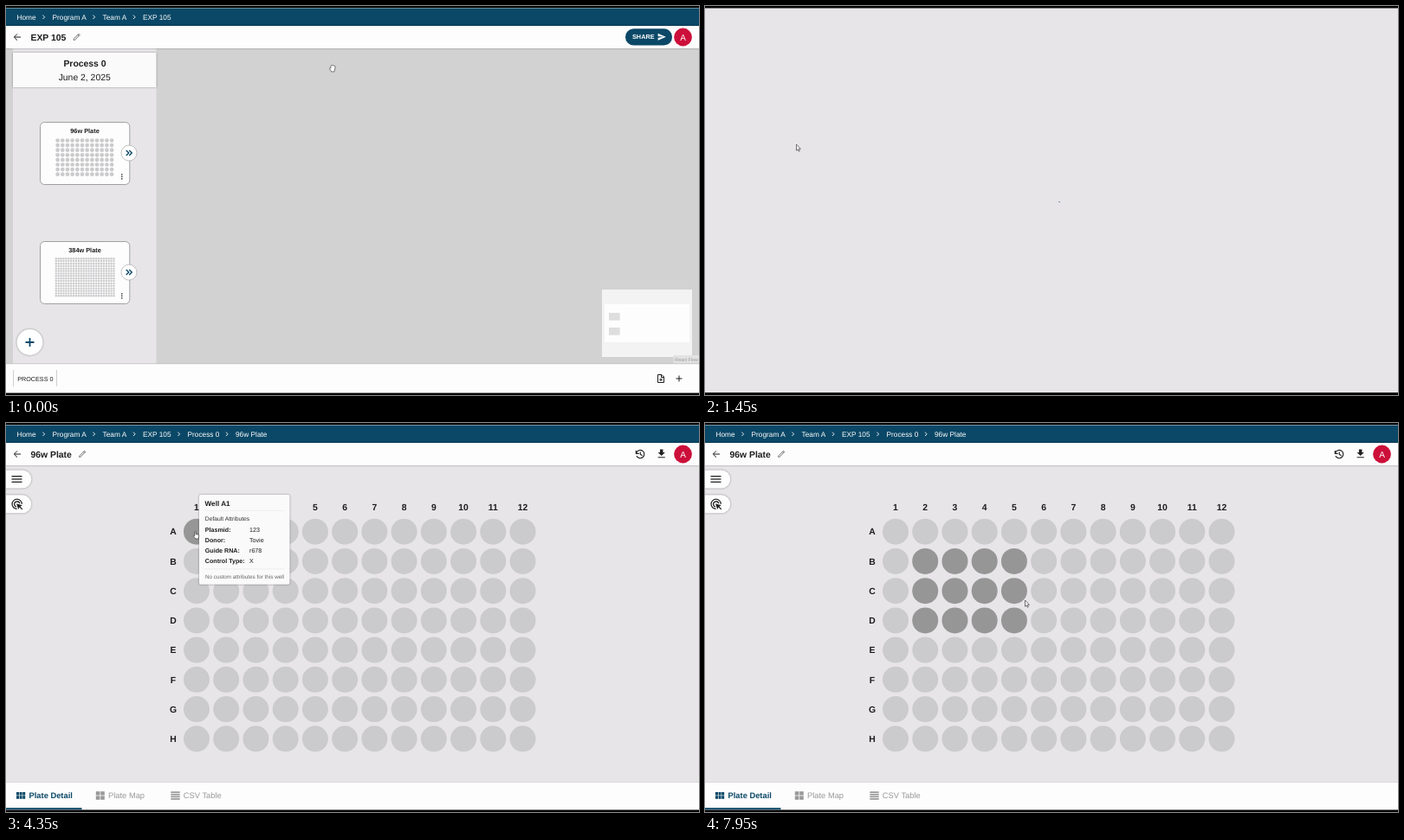
An HTML page that plays this animation: 800x450 px, repeating every 8000 ms.

```html
<!DOCTYPE html>
<html lang="en">
<head>
<meta charset="utf-8">
<title>Plate viewer</title>
<style>
  html, body { margin: 0; width: 100%; height: 100%; overflow: hidden; background: #000; }
  svg { display: block; width: 100vw; height: 100vh; }
  text { font-family: "Liberation Sans", Arial, sans-serif; text-rendering: geometricPrecision; white-space: pre; }
  .shadow { filter: drop-shadow(0 .7px 1.2px rgba(0, 0, 0, .4)); }
</style>
</head>
<body>
<svg id="stage" viewBox="0 0 800 450"></svg>
<script>
const LOOP = 8000, LOAD_AT = 1425, PLATE_AT = 2050;
const BLUE = '#0b4867', INK = '#1d1d1f', GREY = '#999', PALE = '#e7e5e8', WELL = '#cbcacc', DARK = '#969696';
const PITCH = 34.23, X0 = 220, Y0 = 125.7, R = 15;

const rect = (x, y, w, h, fill, extra = '') =>
  `<rect x="${x}" y="${y}" width="${w}" height="${h}" fill="${fill}" ${extra}/>`;
const circle = (x, y, r, fill, extra = '') =>
  `<circle cx="${x}" cy="${y}" r="${r}" fill="${fill}" ${extra}/>`;
const text = (x, y, size, str, { fill = INK, bold = false, mid = false } = {}) =>
  `<text x="${x}" y="${y}" font-size="${size}" fill="${fill}"${bold ? ' font-weight="700"' : ''}${mid ? ' text-anchor="middle"' : ''}>${str}</text>`;
// Icons live in a 24-unit box centred on x, y.
const icon = (x, y, size, d, fill = INK) =>
  `<path transform="translate(${x - size / 2} ${y - size / 2}) scale(${size / 24})" d="${d}" fill="${fill}"/>`;
const lineIcon = (x, y, size, d, color = INK, width = 2) =>
  `<path transform="translate(${x - size / 2} ${y - size / 2}) scale(${size / 24})" d="${d}" fill="none" stroke="${color}" stroke-width="${width}"/>`;
const grid = (cols, rows, draw) =>
  Array.from({ length: cols * rows }, (_, i) => draw(i % cols, Math.floor(i / cols))).join('');

const PLUS = 'M12 5V19M5 12H19';
const PENCIL = 'M4 17L15 6l3 3L7 20H4zM16 5l2-2 3 3-2 2z';
const bars = (x, y, w, n, step, h, fill) => grid(1, n, (_, j) => rect(x, y + j * step, w, h, fill));

function header(crumbs, title, pencilX) {
  const xs = [12.5, 53.5, 111.5, 158, 209.5, 265];
  return rect(0, 2.5, 800, 20.5, BLUE) + rect(0, 23, 800, 26, '#fdfdfd', 'class="shadow"') +
    crumbs.map((c, i) => text(xs[i], 15.6, 8.3, c, { fill: '#fff' }) +
      (i ? lineIcon(xs[i] - 10, 12.8, 9, 'M9 6l6 6-6 6', '#fff', 2.4) : '')).join('') +
    lineIcon(13, 36, 12, 'M20 12H5M12 4.7L4.7 12l7.3 7.3') +
    text(28.5, 39.6, 10.4, title, { bold: true }) +
    lineIcon(pencilX, 36, 10, PENCIL, '#555', 2) +
    circle(781.5, 36, 10.4, '#cc0f3a') + text(781.5, 39.6, 10, 'A', { fill: '#fff', mid: true });
}

function plateNode(y, title, cols, rows, x0, y0, dx, dy, r) {
  return rect(39.5, y, 103.3, 72, '#fdfdfd', 'rx="5" stroke="#8c8c8c" stroke-width=".8"') +
    text(91, y + 12.3, 7.35, title, { bold: true, mid: true }) +
    grid(cols, rows, (i, j) => circle(x0 + i * dx, y0 + j * dy, r, WELL)) +
    grid(1, 3, (_, j) => circle(133.8, y + 60.4 + j * 2.5, .8, '#333')) +
    circle(142, y + 35.6, 9, '#fff', 'stroke="#aaa" stroke-width=".7"') +
    lineIcon(142, y + 35.6, 12, 'M5.5 6l6 6-6 6M12.5 6l6 6-6 6', BLUE, 2.8);
}

const processPage = rect(0, 2, 800, 445.5, '#d2d2d3') +
  rect(8, 49, 165.5, 365, PALE) +
  rect(8, 54, 165.5, 40, '#fafafa', 'class="shadow"') +
  text(91, 69.7, 10.4, 'Process 0', { bold: true, mid: true }) +
  text(90.7, 85.6, 10.4, 'June 2, 2025', { mid: true }) +
  plateNode(134.5, '96w Plate', 12, 8, 59.6, 155.5, 5.68, 5.6, 2.35) +
  plateNode(272.5, '384w Plate', 24, 16, 57.8, 292.2, 2.9, 2.87, 1.2) +
  circle(27.5, 389, 15, '#fff', 'class="shadow"') +
  lineIcon(27.5, 389, 17, PLUS, BLUE, 2.5) +
  rect(688, 328, 104, 78, '#f3f3f3') + rect(691, 345, 98, 44, '#fdfdfd') +
  rect(696, 355, 12.7, 8.7, '#dedede') + rect(696, 372, 12.7, 8.7, '#dedede') +
  rect(770.5, 404, 29.5, 9.5, '#e2e2e2') + text(772, 410.6, 5.4, 'React Flow', { fill: GREY }) +
  rect(0, 414, 800, 33.3, '#fdfdfd') + rect(0, 413.5, 800, .7, '#bbb') +
  rect(8.2, 421, .7, 19, '#bbb') + rect(58.2, 421, .7, 19, '#bbb') +
  text(13.3, 433.5, 7.2, 'PROCESS 0') +
  lineIcon(756, 431, 12, 'M5 3H14l5 5V21H5zM13 3V9H19M12 11V18M8.5 14.5H15.5') +
  lineIcon(777, 431, 12, PLUS) +
  header(['Home', 'Program A', 'Team A', 'EXP 105'], 'EXP 105', 81.5) +
  rect(715, 26.2, 54, 19.3, BLUE, 'rx="9.6"') +
  text(723, 38.4, 7.3, 'SHARE', { fill: '#fff', bold: true }) +
  icon(757, 35.8, 10.5, 'M2 21L23 12 2 3V10l15 2-15 2z', '#fff');

const loadingPage = rect(0, 2.5, 800, 444.7, PALE) +
  `<circle id="spinner" r="20.2" fill="none" stroke="${BLUE}" stroke-width="3.6"/>`;

const sidePill = y => rect(-12, y, 41.3, 21, '#fdfdfd', 'rx="10.5" class="shadow"');
const platePage = rect(0, 2, 800, 445.3, PALE) +
  header(['Home', 'Program A', 'Team A', 'EXP 105', 'Process 0', '96w Plate'], '96w Plate', 88) +
  lineIcon(732, 36, 14, 'M5 15.5A8 8 0 1 0 4.5 10M4 5V11H10M12.5 7.5V12.5l4 2.5', '#222', 2) +
  icon(756.7, 35.7, 14, 'M5 20H19V18H5zM19 9H15V3H9V9H5l7 7z', '#222') +
  sidePill(54.5) + bars(6.5, 61, 12, 3, 3.3, 1.3, '#222') +
  sidePill(83.3) +
  lineIcon(12.7, 93.8, 15, 'M12 21A9 9 0 1 1 21 12M11 17A5 5 0 1 1 17 11', '#222', 2) +
  icon(12.7, 93.8, 15, 'M11 11L22 14.5 18 16.5 22.5 21 21 22.5 16.5 18 14.5 22z', '#222') +
  grid(12, 1, i => text(X0 + i * PITCH, 101, 10.4, i + 1, { bold: true, mid: true })) +
  grid(1, 8, (_, j) => text(193, Y0 + j * PITCH + 3.7, 10.4, 'ABCDEFGH'[j], { bold: true, mid: true })) +
  grid(12, 8, (i, j) => circle(X0 + i * PITCH, Y0 + j * PITCH, R, WELL, 'class="well"')) +
  rect(0, 415.5, 800, 31.8, '#fdfdfd') + rect(0, 415.2, 800, .6, '#ccc') +
  rect(0, 445.2, 87.5, 2, BLUE) +
  grid(3, 2, (i, j) => rect(12 + i * 3.6, 427 + j * 4.2, 3, 3.6, BLUE)) +
  text(26.5, 433.9, 9.35, 'Plate Detail', { fill: BLUE, bold: true }) +
  grid(2, 2, (i, j) => rect(103.8 + i * 5.4, 426.2 + j * 5.2, 4.6, 4.4, GREY)) +
  text(118, 433.9, 9.35, 'Plate Map', { fill: GREY }) +
  bars(190.3, 426.3, 10.4, 4, 2.6, 1.7, GREY) +
  text(204.8, 433.9, 9.35, 'CSV Table', { fill: GREY });

const attributes = [['Plasmid:', '123'], ['Donor:', 'Tovie'], ['Guide RNA:', 'r678'], ['Control Type:', 'X']];
const tooltip = rect(223, 83, 104.5, 103.7, '#fafafa', 'rx="2" class="shadow"') +
  text(229.5, 96.2, 8.2, 'Well A1', { bold: true }) + rect(229.5, 101.5, 92, .5, '#e6e6e6') +
  text(229.8, 113, 6.75, 'Default Attributes', { fill: '#333' }) +
  attributes.map(([key, value], i) => text(229.8, 125.6 + i * 12.1, 7.15, key, { bold: true }) +
    text(281, 125.6 + i * 12.1, 7.15, value)).join('') +
  rect(229.5, 168.7, 92, .5, '#e0e0e0') +
  text(230, 180, 6.3, 'No custom attributes for this well', { fill: '#666' });

const outline = 'fill="#fff" stroke="#222" stroke-width=".6" stroke-linejoin="round"';
const cursors = {
  arrow: `<path d="M0 0V7.2L1.6 5.8 2.7 8.2 3.8 7.7 2.8 5.3H4.9Z" ${outline}/>`,
  hand: `<path d="M-.6 .4Q0-.5.6.4V3.2L3.6 3.9Q4.4 4.2 4.3 5L3.7 8.6H.3L-2.3 5.4Q-2.2 4.3-.6 5.3Z" ${outline}/>`,
  grab: `<path d="M-2.1-2.6Q-1.5-3.6-.9-3 -.1-4.2.6-3.1 1.5-3.6 1.9-2.5 3-2.7 3.1-1.5L2.5 2.2 1.7 4H-1.3L-3.5.7Q-3.5-.5-2-.2Z" ${outline}/>`
};

const group = (id, body) => `<g id="${id}">${body}</g>`;
const stage = document.getElementById('stage');
stage.innerHTML = rect(0, 0, 800, 450, '#000') +
  group('process', processPage) + group('loading', loadingPage) + group('plate', platePage) +
  group('tooltip', tooltip) +
  group('cursor', Object.entries(cursors).map(([id, body]) => group(id, body)).join(''));

const $ = id => document.getElementById(id);
const show = (id, on) => $(id).setAttribute('display', on ? 'inline' : 'none');
const wells = [...document.querySelectorAll('.well')].map((node, i) =>
  ({ node, x: X0 + i % 12 * PITCH, y: Y0 + Math.floor(i / 12) * PITCH }));

const clamp = v => Math.min(1, Math.max(0, v));
const ease = v => v * v * (3 - 2 * v);
const mix = (a, b, k) => a + (b - a) * k;

// Pointer path: time, x, y
const path = [
  [0, 377, 72], [150, 377, 72], [1200, 105.5, 160], [2150, 105.5, 160], [2750, 155.5, 116.5],
  [3250, 218.5, 125.3], [5250, 218.5, 125.3], [5700, 200.5, 110.5], [5850, 200.5, 110.5],
  [6050, 203, 141], [6250, 237, 143], [6400, 237, 143], [7250, 373, 240], [7450, 373, 240],
  [7850, 369.5, 205], [LOOP, 369.5, 205]
];
const DRAG = { start: 6400, end: 7250, x: 237, y: 143 };

function pointerAt(t) {
  const i = Math.max(1, path.findIndex(p => p[0] > t));
  const [a, b] = [path[i - 1], path[i]];
  const k = ease(clamp((t - a[0]) / (b[0] - a[0])));
  return { x: mix(a[1], b[1], k), y: mix(a[2], b[2], k) };
}

function drawSpinner(t) {
  const p = t / 1400 % 1;
  const grow = ease(clamp(p * 2)), slide = ease(clamp(p * 2 - 1));
  const ring = $('spinner');
  ring.setAttribute('transform', `translate(400 225.3) scale(.4545) rotate(${p * 360})`);
  ring.setAttribute('stroke-dasharray', `${mix(1, 100, grow)} 200`);
  ring.setAttribute('stroke-dashoffset', -15 * grow - 110 * slide);
}

function drawWells(t, pointer) {
  const corner = pointerAt(Math.min(t, DRAG.end));
  let over = false;
  wells.forEach(({ node, x, y }) => {
    const hover = Math.hypot(pointer.x - x, pointer.y - y) < R;
    const selected = t > DRAG.start && x + R > DRAG.x && y + R > DRAG.y &&
      x - R < corner.x && y - R < corner.y;
    over = over || hover;
    node.setAttribute('fill', hover || selected ? DARK : WELL);
  });
  return over;
}

function render(t) {
  const onProcess = t < LOAD_AT, onPlate = t >= PLATE_AT;
  const p = pointerAt(t);
  show('process', onProcess);
  show('loading', !onProcess && !onPlate);
  show('plate', onPlate);
  let kind = 'arrow';
  if (onProcess) kind = p.x > 39 && p.x < 143 && p.y > 134 && p.y < 207 ? 'hand' : 'grab';
  else if (onPlate) kind = drawWells(t, p) ? 'hand' : 'arrow';
  else drawSpinner(t - LOAD_AT);
  Object.keys(cursors).forEach(id => show(id, id === kind));
  $('cursor').setAttribute('transform', `translate(${p.x} ${p.y})`);
  const opacity = Math.min(clamp((t - 3300) / 200), clamp((5550 - t) / 150));
  show('tooltip', opacity > 0);
  $('tooltip').setAttribute('opacity', opacity);
}

const began = performance.now();
function tick() {
  render((performance.now() - began) % LOOP);
  requestAnimationFrame(tick);
}
tick();
</script>
</body>
</html>
```
